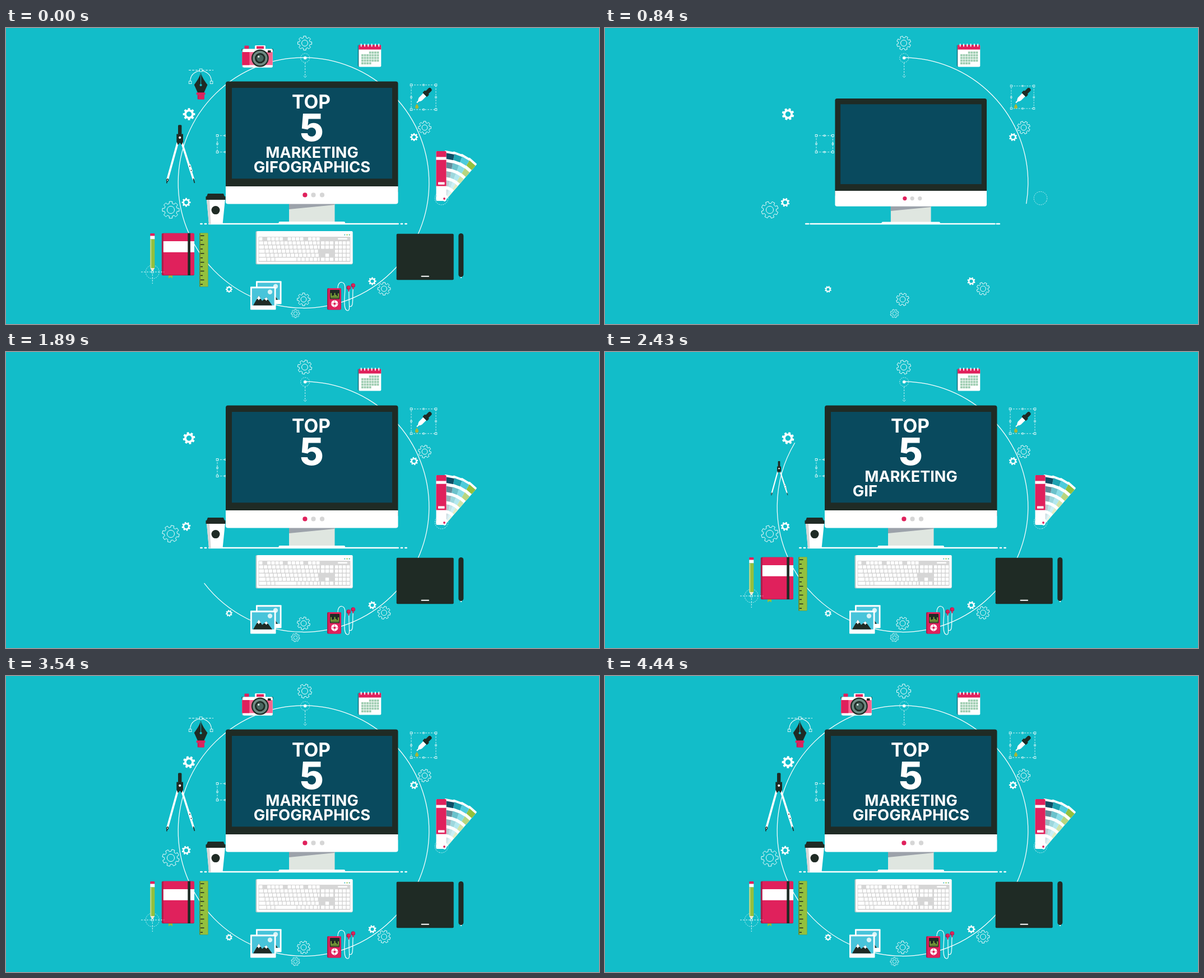
These frames come from a looping animation (1058 by 529 pixels, 4.47 s). An HTML page with a canvas:

```html
<!DOCTYPE html>
<html lang="en">
<head>
<meta charset="utf-8">
<title>Top 5 Marketing Gifographics</title>
<style>
html, body { margin: 0; width: 100%; height: 100%; overflow: hidden; background: #12bdc9 }
canvas { display: block }
</style>
</head>
<body>
<canvas id="stage" width="1058" height="529"></canvas>
<script>
const c = document.getElementById('stage').getContext('2d');
const LOOP = 4470, STEP = 30, TAU = Math.PI * 2;
const BG = '#12bdc9', DARK = '#1f2b25', PINK = '#e0215c', GREEN = '#94c03d', GREY = '#d6d6d6', WHITE = '#fff';
let now = 0;

// Progress from 0 to 1 with a sine ease-out
const ease = (start, dur) => Math.sin(Math.min(1, Math.max(0, (now - start) / dur)) * Math.PI / 2);

function box(x, y, w, h, fill, r = 0) {
  c.fillStyle = fill;
  c.beginPath();
  c.roundRect(x, y, w, h, r);
  c.fill();
}
function dot(x, y, r, fill) {
  c.fillStyle = fill;
  c.beginPath();
  c.arc(x, y, r, 0, TAU);
  c.fill();
}
function shape(d, fill) {
  c.fillStyle = fill;
  c.fill(new Path2D(d));
}
function stroke(d, width = 1, dash = [], color = WHITE) {
  c.strokeStyle = color;
  c.lineWidth = width;
  c.setLineDash(dash);
  c.stroke(new Path2D(d));
  c.setLineDash([]);
}
function dashedRing(x, y, r, turn) {
  c.strokeStyle = WHITE;
  c.lineWidth = .7;
  c.setLineDash([2, 1.6]);
  c.beginPath();
  c.arc(x, y, r, turn, turn + TAU);
  c.stroke();
  c.setLineDash([]);
}
function handle(x, y, s) {
  box(x - s / 2, y - s / 2, s, s, BG);
  c.strokeStyle = WHITE;
  c.lineWidth = .8;
  c.strokeRect(x - s / 2, y - s / 2, s, s);
}
function selection(x, y, s) {
  stroke(`M${x} ${y}h${s}v${s}h${-s}z`, .75, [3, 2]);
  for (let i = 0; i < 3; i++)
    for (let j = 0; j < 3; j++)
      if (i != 1 || j != 1) handle(x + i * s / 2, y + j * s / 2, i == 1 || j == 1 ? 2.4 : 3.6);
}

// Draws a part scaled around (x, y)
function grow(k, x, y, draw) {
  if (k <= 0) return;
  c.save();
  c.translate(x, y);
  c.scale(k, k);
  c.translate(-x, -y);
  draw();
  c.restore();
}
const pop = (start, x, y, draw, dur = 250) => grow(ease(start, dur), x, y, draw);

function gear(x, y, r, solid, turn) {
  c.beginPath();
  for (let i = 0; i < 8; i++) {
    const a = turn + i * TAU / 8;
    for (const [da, k] of [[-.25, .76], [-.17, 1], [.17, 1], [.25, .76]])
      c.lineTo(x + r * k * Math.cos(a + da), y + r * k * Math.sin(a + da));
  }
  c.closePath();
  const hole = r * .43;
  c.moveTo(x + hole, y);
  c.arc(x, y, hole, 0, TAU);
  if (solid) {
    c.fillStyle = WHITE;
    c.fill('evenodd');
  } else {
    c.strokeStyle = WHITE;
    c.lineWidth = r > 9 ? .95 : .75;
    c.stroke();
  }
}

const gears = [
  [533, 27, 12.7], [747, 178, 11.5], [294, 325, 15.2], [531, 485, 11.5], [516.5, 510.3, 7.6], [674.5, 466, 11.5],
  [326.5, 154, 11, 1], [728, 195, 7.2, 1], [321.5, 311.7, 8, 1], [398, 467, 6, 1], [653.5, 452.5, 7.2, 1]
];

function backdrop() {
  const turn = now / LOOP * TAU * 3 / 8;
  const sweep = now < STEP ? TAU : Math.min(360, Math.max(0, (now - 57) * .1265)) * TAU / 360;
  c.strokeStyle = WHITE;
  c.lineWidth = 1.25;
  c.beginPath();
  c.arc(531, 276.7, 223.8, -TAU / 4 + .01, -TAU / 4 + .01 + sweep);
  c.stroke();
  for (const [x, y, r, solid] of gears) gear(x, y, r, solid, solid ? -turn : turn);
  dashedRing(533.7, 53.5, 8, turn);
  dot(533.7, 53.5, 2.8, WHITE);
  stroke('M533.7 62V87', .8, [3, 2]);
  stroke('M531 85.5L533.7 88.3L536.4 85.5', .8);
  dashedRing(777, 304.2, 11.8, turn);
  selection(377, 192.3, 29.4);
}

function desk() {
  const k = ease(480, 420), out = ease(780, 240);
  if (k > 0) box(531 - 170 * k, 348.8, 340 * k, 2.5, WHITE, 1.2);
  if (out > 0)
    for (const side of [-1, 1])
      for (const d of [175, 182.5]) box(531 + side * (165 + (d - 165) * out) - 2.4, 348.8, 4.8, 2.5, WHITE, 1.2);
}

function monitor() {
  shape('M505 314H586.5V347H505z', '#dfe6e0');
  shape('M505 314H586.5V316L505 324z', '#9ca2aa');
  box(486.5, 346, 118.5, 5, WHITE, [2, 2, 0, 0]);
  box(392, 95.5, 307.5, 200, DARK, 4);
  box(392, 283, 307.5, 31.5, WHITE, [0, 0, 4, 4]);
  box(403, 107, 286, 162.3, '#094a5e');
  dot(533.4, 298.4, 4.1, PINK);
  dot(548.5, 298.4, 4.1, GREY);
  dot(564, 298.4, 4.1, GREY);
}

const title = [
  ['TOP', 544.5, 144, 33.5, 700], ['5', 545.5, 201.5, 68, 800],
  ['MARKETING', 546, 231.5, 27, 700], ['GIFOGRAPHICS', 546, 257.5, 27.4, 700]
];
function typeTitle() {
  let left = Math.floor((now - 1690) / 38.5);
  c.fillStyle = WHITE;
  for (const [text, x, y, size, weight] of title) {
    if (left <= 0) return;
    c.font = `${weight} ${size}px Inter, sans-serif`;
    c.fillText(text.slice(0, left), x - c.measureText(text).width / 2, y);
    left -= text.length + 1;
  }
}

function cup() {
  shape('M358 306H391L386.5 350.5H362z', WHITE);
  shape('M358 306H363L365.5 350.5H362z', GREY);
  shape('M360 296H388L390 301H391.5V307H356.5V301H358z', DARK);
  dot(374, 325.6, 7.5, DARK);
}

function keyboard() {
  box(445.5, 363, 173, 59.5, '#b7c9c9', 2);
  box(447.5, 363, 171, 58.5, WHITE, 2);
  box(450.5, 373, 164, 45, GREY, 1);
  ['#55c3c8', GREEN, '#57b894'].forEach((f, i) => box(603.3 + i * 4.2, 368.6, 2, 2, f));
  for (let row = 0; row < 6; row++) {
    const y = 374 + row * 7.3;
    let x = 451.5;
    for (let i = 0; x < 559; i++) {
      let w = i ? 5.9 : 5.9 + row * 1.4;
      if (row == 5 && i == 3) w = 38;
      w = Math.min(w, 559.5 - x);
      if (w > 2 && (row || i % 5 != 1)) box(x, y, w, 5.8, WHITE, .8);
      x += w + 1.4;
    }
    for (let i = 0; i < 3; i++) {
      if (row < 3 && row > 0 || row == 5 || row == 4 && i == 1) box(562 + i * 7.8, y, 6.4, 5.8, WHITE, .8);
    }
    for (let i = 0; i < 4; i++) if (row) box(587 + i * 6.9, y, 5.5, 5.8, WHITE, .8);
  }
  box(592, 375.5, 17, 2.5, WHITE, 1);
}

function calendar() {
  box(627.8, 30, 41, 39, '#176d7b', 2);
  box(629.3, 30, 40, 39.5, WHITE, 2);
  box(629.3, 30, 40, 8.5, PINK, [2, 2, 0, 0]);
  for (let i = 0; i < 6; i++) box(632.7 + i * 6.3, 28, 2, 5.5, WHITE, 1);
  for (let i = 3; i < 32; i++) box(634 + i % 7 * 4.6, 42 + Math.floor(i / 7) * 4.8, 3.8, 3.8, '#9dccb0');
}

function dropper() {
  c.save();
  c.translate(745, 121.5);
  c.rotate(TAU / 8);
  box(-3.6, -19, 7.2, 13, DARK, 3.5);
  box(-5.5, -9, 11, 6.2, DARK, 1.5);
  shape('M-3.8 -2.8H3.8V8Q3 11 1 13V17H-1V13Q-3 11 -3.8 8z', WHITE);
  c.restore();
  shape('M733 135.5C734.5 138 736 139.5 736 141.3A3 3 0 0 1 730 141.3C730 139.5 731.5 138 733 135.5z', '#a9b536');
}

const tones = [[14, 78, 101], [30, 163, 178], [78, 203, 219], [148, 192, 61]];
function swatches() {
  const open = ease(1100, 240);
  for (let i = 4; i >= 0; i--) {
    c.save();
    c.translate(782, 305);
    c.rotate(i * open * 10.25 * TAU / 360);
    box(-14.5, -85, 18, 89, WHITE, 1.5);
    if (i) {
      for (let row = 0; row < 5; row++) {
        const tint = tones[i - 1].map(v => 255 - (255 - v) * .66 ** row);
        box(-14.5, -81 + row * 16, 18, 10.5, `rgb(${tint})`);
      }
    } else {
      box(-14.5, -85, 18, 62.5, PINK, [1.5, 1.5, 0, 0]);
      box(-14.5, -74.5, 18, 5.2, WHITE);
      box(-11, -29.5, 11.5, 4.3, WHITE);
      dot(0, 0, 1.9, PINK);
    }
    c.restore();
  }
}

function tablet() {
  box(696.7, 367.8, 102, 82.4, DARK, 2);
  box(740.5, 442.8, 14.5, 1.9, WHITE, 1);
  box(811, 443, 2, 4, WHITE, 1);
  box(807.3, 367, 9, 78, DARK, 4.5);
}

function player() {
  stroke('M592 465C592 458 595 454 599 454.5C609 456 603 472 604 492C604 502 606 505 610 505C615 505 611 490 612 466M612 497C622 502 617 480 619.5 464', 1.2);
  box(573, 465, 25, 38.5, '#a91d49', 2);
  box(575, 465, 22.5, 38.5, PINK, 2);
  box(578, 468, 17.2, 16.5, DARK, 1);
  for (let i = 0; i < 7; i++) {
    const h = 5 + 3 * Math.sin(i * 1.9 + 2);
    box(579.3 + i * 2.15, 481.5 - h, 1.6, h, GREEN);
  }
  box(579.3, 482.3, 14.7, .8, GREEN);
  dot(586.3, 492.7, 6.2, WHITE);
  dot(586.3, 492.7, 2.3, PINK);
  for (const [dx, dy] of [[0, -4.3], [0, 4.3], [-4.3, 0], [4.3, 0]]) dot(586.3 + dx, 492.7 + dy, .8, PINK);
  for (const [x, y] of [[611.3, 464], [619.3, 460]]) {
    dot(x, y, 3.8, '#a91d49');
    dot(x + .6, y - .4, 2.8, PINK);
    box(x - 1, y + 3, 2.2, 4, PINK, 1);
  }
}

function photo(x, y) {
  box(x, y, 45.5, 41.3, WHITE, 1);
  box(x + 2.7, y + 3, 40, 30.5, '#48c4da');
  dot(x + 35, y + 9.5, 4.2, '#d9f3f6');
  c.save();
  c.translate(x, y);
  shape('M5 33.5L15 16L21 25.5L28.5 19L39 33.5z', DARK);
  shape('M15 16L19 22.3L17 21.5L15 24.5L13 21.5L11 23z', WHITE);
  shape('M28.5 19L32 23.8L30 23L28.5 25.5L26.5 23L24.5 22.5z', WHITE);
  c.restore();
}
function photos() {
  photo(446, 452.3);
  photo(436, 462.2);
}

function ruler() {
  box(345, 366.5, 15.5, 96, '#6c8f31', .5);
  box(347, 366.5, 13.3, 95.5, GREEN, .5);
  for (let i = 0; i < 12; i++) box(347, 370.5 + i * 7.9, i % 2 ? 4 : 6.5, 1.5, DARK);
}

function notebook() {
  shape('M290 441H297V447.5L293.5 445L290 447.5z', GREEN);
  box(277.8, 366.7, 58, 75.5, '#a91d49', 2);
  box(280.8, 366.7, 55.2, 74.5, PINK, 2);
  box(280.8, 381, 55.2, 19.8, WHITE);
  box(324.3, 366.7, 4.6, 75.3, DARK);
}

function pencil() {
  dashedRing(261.3, 436, 12, 0);
  stroke('M241 436H282M261.3 420V457', .8, [3, 2]);
  box(257.3, 367, 8, 5, PINK, 1);
  box(257.3, 371.5, 8, 6, WHITE);
  box(257.3, 377.5, 8, 51.5, GREEN);
  box(257.3, 377.5, 2, 51.5, '#c3d992');
  shape('M257.3 429H265.3L261.3 436z', '#f5ead2');
  handle(261.3, 436, 3.4);
}

function compass() {
  stroke('M306.3 205L288 271M313.7 205L334.7 271', 3.6);
  stroke('M288.6 269L286.6 277.5M334.2 269L336.5 277', 1.6, [], DARK);
  dot(288, 272, 2.3, DARK);
  dot(288, 272, 1, WHITE);
  stroke('M326.8 244L331 257', 4.6);
  dot(328, 247, 1, DARK);
  dot(330.5, 254.5, 1, DARK);
  box(307, 173.3, 6.4, 17, DARK, 1.5);
  shape('M304.3 189.5H316V203L313.5 209L310.2 205L306.7 209L304.3 203z', DARK);
  dot(310.2, 195.8, 2.1, WHITE);
}

function nib() {
  stroke('M326 75.4H370', .9, [4, 2]);
  stroke('M345 76.5C334 79 329 86 328.6 95M350 76.5C361 79 366 86 366.6 95', 1.1);
  handle(347.6, 75.4, 4.8);
  handle(328.6, 97.3, 4.6);
  handle(366.6, 97.3, 4.6);
  shape('M347.6 80C350 89 356 97 359.5 101.5L353 116H342.2L335.7 101.5C339 97 345 89 347.6 80z', DARK);
  stroke('M347.6 82V100', .9, [], BG);
  dot(347.6, 102, 2.1, BG);
  box(339.7, 115.3, 15.7, 4.3, PINK, 1);
  box(341.7, 119.6, 12, 7.8, '#c91c51', 1);
  box(344, 119.6, 9.7, 7.8, PINK, 1);
}

function camera() {
  box(444, 31, 19, 9, WHITE, 1.5);
  box(447, 32.5, 13, 5, PINK);
  box(425.5, 31.5, 8, 6, PINK, 1);
  box(420.5, 37.5, 3, 4, DARK);
  box(473.5, 37.5, 3, 4, DARK);
  box(421.3, 37.5, 54.4, 33, '#b9d5d6', 2);
  box(423, 37.5, 52.7, 33, WHITE, 2);
  box(421.3, 43, 54.4, 23.3, '#f5668f');
  box(421.3, 43, 13, 23.3, PINK);
  box(467, 40, 5.5, 4, DARK);
  dot(453.3, 54, 15.4, DARK);
  dot(453.3, 54, 13.2, '#6f8a82');
  dot(453.3, 54, 9.3, DARK);
  dot(453.3, 54, 6.4, '#48665f');
  dot(450.7, 51.3, 1.7, '#dfeae6');
}

function draw(time) {
  now = Math.floor(time % LOOP / STEP) * STEP;
  c.fillStyle = BG;
  c.fillRect(0, 0, 1058, 529);
  backdrop();
  // The loop opens on one flash of the finished scene
  if (now < STEP) now = LOOP;
  desk();
  pop(566, 545.6, 350, monitor, 400);
  typeTitle();
  pop(960, 374, 350, cup);
  pop(1173, 532, 363, keyboard, 300);
  pop(260, 649, 49, calendar);
  pop(480, 745, 122, dropper);
  pop(530, 745, 123.8, () => selection(723, 101.8, 44), 420);
  pop(1020, 777, 304, swatches);
  pop(1080, 752, 409, tablet);
  pop(1297, 598, 479, player);
  pop(1600, 464, 478, photos);
  pop(1890, 353, 414, ruler);
  pop(1960, 307, 405, notebook);
  pop(2145, 261, 412, pencil);
  pop(2330, 311, 226, compass);
  pop(2530, 348, 100, nib);
  pop(2740, 449, 51, camera);
}

function tick() {
  draw(performance.now());
  requestAnimationFrame(tick);
}
tick();
</script>
</body>
</html>
```
